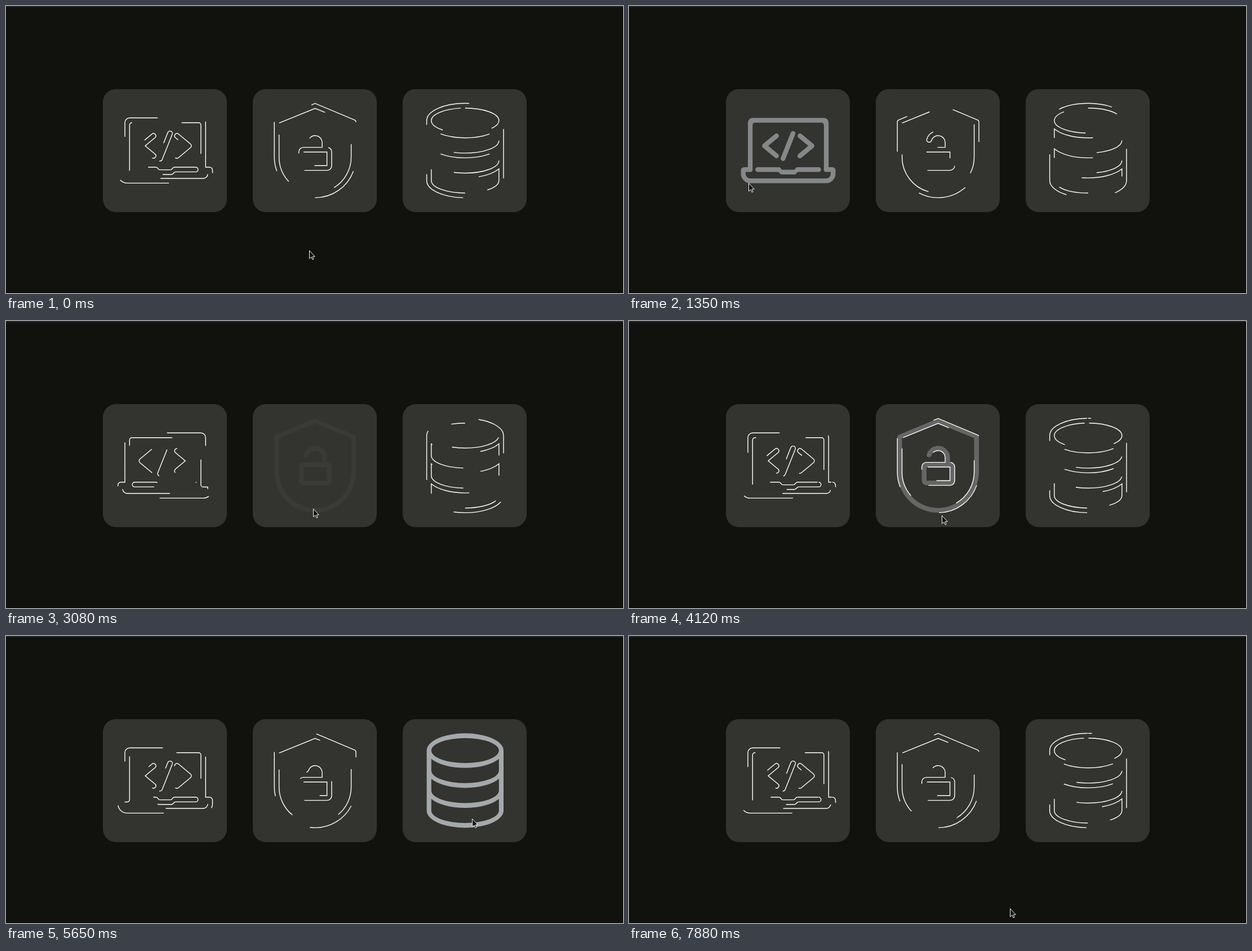
Recreate the animation shown at these times as an HTML page with a canvas. Size 1095 by 511 pixels, loop 7.91 s.

```html
<!DOCTYPE html>
<html lang="en">
<head>
<meta charset="utf-8">
<title>Dashed icons</title>
<style>
  html, body { margin: 0; width: 100%; height: 100%; overflow: hidden; background: #11120d; }
  canvas { display: block; }
</style>
</head>
<body>
<canvas id="stage" width="1095" height="511"></canvas>
<script>
const ctx = document.getElementById('stage').getContext('2d');
const LOOP = 7910;
const DASH = 87.9;
const HALF_CYCLE = 2000;
const CYCLE_SHIFT = 29;
const FADE = 500;

function bezier(x1, y1, x2, y2) {
  const at = (a, b, s) => 3 * (1 - s) * (1 - s) * s * a + 3 * (1 - s) * s * s * b + s * s * s;
  return x => {
    if (x <= 0) return 0;
    if (x >= 1) return 1;
    let lo = 0, hi = 1;
    for (let i = 0; i < 24; i++) {
      const mid = (lo + hi) / 2;
      if (at(x1, x2, mid) < x) lo = mid; else hi = mid;
    }
    return at(y1, y2, lo);
  };
}
const ease = bezier(.25, .1, .25, 1);
const easeInOut = bezier(.42, 0, .58, 1);

// Outer contours run counterclockwise, holes clockwise; dashes begin at each M.
const laptop = [
  'M361 287H354.3V207.7A8.4 8.4 0 0 0 345.9 199.3H219.4A8.4 8.4 0 0 0 211 207.7V287H204',
  'A5.4 5.4 0 0 0 198.6 292.4V298.8A16.6 16.6 0 0 0 215.2 315.4H349.9',
  'A16.6 16.6 0 0 0 366.5 298.8V292.4A5.4 5.4 0 0 0 361 287Z',
  'M358 299.3A8 8 0 0 1 350 307H215A8 8 0 0 1 207 299.3V295.5H215.2A4.1 4.1 0 0 0 219.3 291.4V211.9',
  'A4.2 4.2 0 0 1 223.5 207.7H341.7A4.2 4.2 0 0 1 345.9 211.9V291.4A4.1 4.1 0 0 0 350 295.5H358Z',
  'M336.6 287H299C294.5 287 296 291.6 292 291.6H273C269 291.6 270.5 287 266 287H228.4',
  'A4.2 4.2 0 0 0 228.4 295.4H264C268 295.4 267 300 272 300H293C298 300 297 295.4 301 295.4H336.6',
  'A4.2 4.2 0 0 0 336.6 287Z',
  'M259.3 270.2A4.2 4.2 0 0 0 264.7 263.8L247 249L264.7 234.2A4.2 4.2 0 0 0 259.3 227.8',
  'L237.7 245.8A4.2 4.2 0 0 0 237.7 252.2Z',
  'M272 275.8A4.2 4.2 0 0 0 277.2 273.3L295.1 228.2A4.2 4.2 0 0 0 287.3 225.1',
  'L269.4 270.3A4.2 4.2 0 0 0 272 275.8Z',
  'M300.4 270.1A4.2 4.2 0 0 0 305.9 270.2L327.5 252.2A4.2 4.2 0 0 0 327.5 245.8L305.9 227.8',
  'A4.2 4.2 0 0 0 300.5 234.2L318.2 249L300.5 263.8A4.2 4.2 0 0 0 300.4 270.1Z'
].join('');

const shield = [
  'M476.2 206.5V269A72.4 72.4 0 0 0 621 269V206.5Q621 203.8 618.5 202.8L548.6 173.4',
  'L478.7 202.8Q476.2 203.8 476.2 206.5Z',
  'M484.6 208.4L548.6 182.3L612.6 208.4V269A64 64 0 0 1 484.6 269Z',
  'M529.5 292.6H569.6A8.4 8.4 0 0 0 578 284.2V260A8.4 8.4 0 0 0 569.6 251.6V242.8',
  'A21 21 0 0 0 528.3 237.9A4.3 4.3 0 0 0 536.6 239.8A12.5 12.5 0 0 1 561.1 242.8V251.6H528',
  'A8.4 8.4 0 0 0 519.6 260V284.2A8.4 8.4 0 0 0 528 292.6Z',
  'M528 260H569.6V284.2H528Z'
].join('');

const band = y =>
  `M874.8 ${y}A60 22.3 0 0 1 754.8 ${y}V${y - 20.9}A68.2 30.7 0 0 0 874.8 ${y - 20.9}Z`;
const database = [
  'M814.8 173.3A68.2 30.7 0 0 0 746.6 204V310.7A68.2 30.7 0 0 0 883 310.7V204',
  'A68.2 30.7 0 0 0 814.8 173.3Z',
  'M814.8 181.7A60 22.3 0 0 1 814.8 226.3A60 22.3 0 0 1 814.8 181.7Z',
  band(239.6), band(275.2),
  'M814.8 333A60 22.3 0 0 1 754.8 310.7V290A68.2 30.7 0 0 0 874.8 290V310.7',
  'A60 22.3 0 0 1 814.8 333Z'
].join('');

const icons = [
  { shape: new Path2D(laptop), cardX: 172, enter: 1135, leave: 1790 },
  { shape: new Path2D(shield), cardX: 438, enter: 3043, leave: 3960 },
  { shape: new Path2D(database), cardX: 704, enter: 5150, leave: 6475 }
];

const arrow = new Path2D('M0 0V14.4L3.4 11.4L5.6 16.2L7.7 15.3L5.6 10.6H9.8Z');

// Pointer stops: time, x, y
const pointer = [
  [0, 538, 435], [120, 536, 434], [450, 440, 405], [820, 300, 370], [1130, 228, 340],
  [1350, 212, 315], [1600, 214, 312], [1780, 236, 340], [2100, 330, 410], [2420, 450, 446],
  [2700, 520, 410], [3040, 545, 341], [3080, 545, 334], [3300, 547, 312], [3650, 548, 308],
  [3950, 554, 341], [4010, 555, 346], [4150, 555, 346], [4450, 598, 405], [4810, 700, 424],
  [5140, 790, 342], [5400, 825, 326], [5650, 827, 325], [6250, 826, 326], [6460, 808, 358],
  [6700, 742, 432], [6960, 676, 485], [LOOP, 676, 485]
];

function pointerAt(t) {
  const i = Math.max(1, pointer.findIndex(p => p[0] > t));
  const [t0, x0, y0] = pointer[i - 1];
  const [t1, x1, y1] = pointer[i];
  const k = (t - t0) / (t1 - t0);
  return [x0 + (x1 - x0) * k, y0 + (y1 - y0) * k];
}

function dashShift(t) {
  const x = ((t + CYCLE_SHIFT) / HALF_CYCLE) % 2;
  return 2 * DASH * easeInOut(x > 1 ? 2 - x : x);
}

function fillLevel(t, { enter, leave }) {
  if (t < enter) return 0;
  return t < leave ? ease((t - enter) / FADE) : 1 - ease((t - leave) / FADE);
}

function drawIcon(icon, t) {
  ctx.fillStyle = '#33332f';
  ctx.beginPath();
  ctx.roundRect(icon.cardX, 148, 220, 219, 23);
  ctx.fill();

  const level = fillLevel(t, icon);
  if (level > 0) {
    ctx.globalAlpha = level;
    ctx.fillStyle = '#a4a9ac';
    ctx.fill(icon.shape, 'evenodd');
    ctx.globalAlpha = 1;
  }
  if (t >= icon.enter && t < icon.leave) return;
  ctx.strokeStyle = '#fff';
  ctx.lineWidth = 1.4;
  ctx.setLineDash([DASH, DASH]);
  ctx.lineDashOffset = -dashShift(t);
  ctx.stroke(icon.shape);
  ctx.setLineDash([]);
}

function drawPointer(t) {
  const [x, y] = pointerAt(t);
  ctx.save();
  ctx.translate(Math.round(x) + .5, Math.round(y) + .5);
  ctx.fillStyle = '#11110f';
  ctx.fill(arrow);
  ctx.strokeStyle = '#f4f4f2';
  ctx.lineWidth = 1;
  ctx.stroke(arrow);
  ctx.restore();
}

function draw(now) {
  const t = now % LOOP;
  ctx.fillStyle = '#11120d';
  ctx.fillRect(0, 0, 1095, 511);
  ctx.fillStyle = '#2d2e2c';
  ctx.fillRect(0, 0, 1095, 1.5);
  ctx.fillStyle = '#080504';
  ctx.fillRect(0, 510, 1095, 1);
  ctx.fillRect(1094, 2, 1, 509);
  icons.forEach(icon => drawIcon(icon, t));
  drawPointer(t);
}

function tick() {
  draw(performance.now());
  requestAnimationFrame(tick);
}
tick();
</script>
</body>
</html>
```
